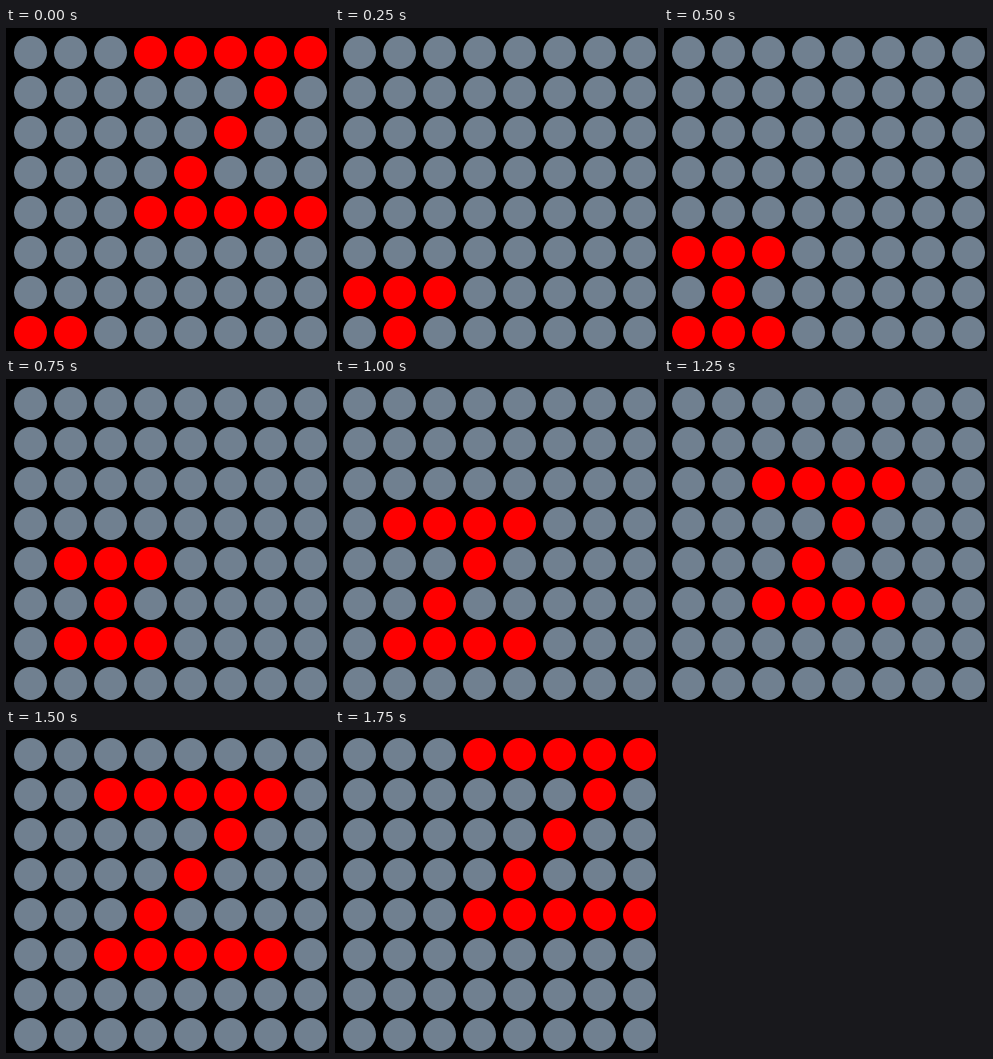
Recreate the animation shown at these times as an HTML page with a canvas. Size 323 px wide and 323 px high, loop 2000 ms.

```html
<!DOCTYPE html>
<html lang="en">
<head>
<meta charset="utf-8">
<title>Dot matrix Z</title>
<style>
html, body { margin: 0; width: 100%; height: 100%; overflow: hidden; background: #000; }
canvas { display: block; }
</style>
</head>
<body>
<canvas id="stage" width="323" height="323"></canvas>
<script>
const ctx = document.getElementById('stage').getContext('2d');
const CELLS = 8, PITCH = 40, STEP_MS = 250, STEPS = 8;

// The Z climbs one row per step, drifts right and grows every second step.
function inZ(step, col, row) {
  const size = Math.max(3, 2 + (step >> 1));
  const x = col - ((step - 1) >> 1);
  const y = row - (7 - step);
  if (x < 0 || y < 0 || x >= size || y >= size) return false;
  return y === 0 || y === size - 1 || x + y === size - 1;
}

function draw(step) {
  ctx.fillStyle = '#000';
  ctx.fillRect(0, 0, 323, 323);
  for (let row = 0; row < CELLS; row++) {
    for (let col = 0; col < CELLS; col++) {
      // The finished Z lingers while the next one enters.
      const lit = inZ(step, col, row) || (step === 0 && inZ(STEPS - 1, col, row));
      ctx.fillStyle = lit ? '#f00' : '#708090';
      ctx.beginPath();
      ctx.arc(24.5 + col * PITCH, 24.5 + row * PITCH, 16.5, 0, Math.PI * 2);
      ctx.fill();
    }
  }
}

const start = performance.now();
function tick() {
  const elapsed = performance.now() - start;
  draw(Math.floor(elapsed / STEP_MS) % STEPS);
  requestAnimationFrame(tick);
}
tick();
</script>
</body>
</html>
```
